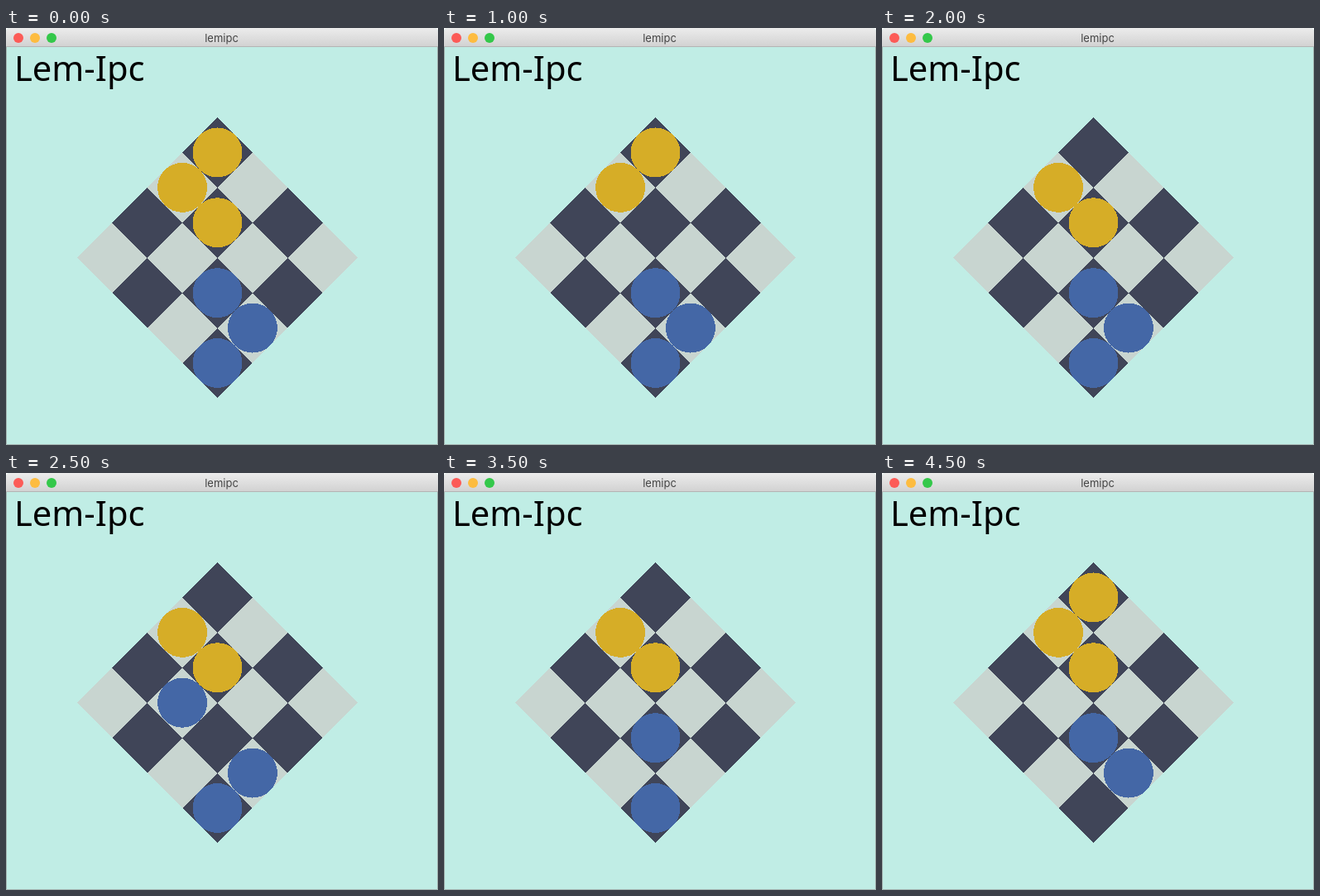
Write an HTML page that moves like this. It is 522 px wide and 504 px high and loops after 5000 ms.

```html
<!DOCTYPE html>
<html lang="en">
<head>
<meta charset="utf-8">
<title>lemipc</title>
<style>
  html, body { margin: 0; width: 100%; height: 100%; overflow: hidden; background: #fff; }
  svg { display: block; }
</style>
</head>
<body>
<svg width="522" height="504" viewBox="0 0 522 504">
  <defs>
    <linearGradient id="bar" x2="0" y2="1">
      <stop stop-color="#ececec"/>
      <stop offset="1" stop-color="#d2d2d2"/>
    </linearGradient>
    <clipPath id="window"><path d="M0 504V5Q0 0 5 0H517Q522 0 522 5V504Z"/></clipPath>
  </defs>
  <g clip-path="url(#window)">
    <rect width="522" height="504" fill="#c0ede5"/>
    <rect width="522" height="22" fill="url(#bar)"/>
    <rect y="22" width="522" height="1" fill="#b4b4b4"/>
    <path d="M.5 23V503.5H521.5V23" fill="none" stroke="#a3b3af"/>
    <circle cx="15" cy="12" r="6" fill="#fc5b57"/>
    <circle cx="35" cy="12" r="6" fill="#fdbc40"/>
    <circle cx="55" cy="12" r="6" fill="#34c84a"/>
    <text x="260.5" y="17" text-anchor="middle" font-family="Inter, sans-serif" font-size="13" fill="#444">lemipc</text>
    <text x="10" y="64" font-family="'Noto Sans', sans-serif" font-size="41.7">Lem-Ipc</text>
  </g>
  <g id="board" shape-rendering="crispEdges"></g>
  <g id="pieces" shape-rendering="crispEdges"></g>
</svg>
<script>
const HALF = 30 * Math.SQRT2; // half the diagonal of a 60 px cell
const STEP_MS = 500;
const YELLOW = '#d6ad27', BLUE = '#4467a6';

// Occupied cells per step, each written as column and row digits
const steps = [
  ['00 01 11', '22 32 33'],
  ['00 01 21', '22 32 33'],
  ['00 01', '22 32 33'],
  ['00 11', '22 32 33'],
  ['01 11', '22 32 33'],
  ['01 11', '12 32 33'],
  ['01 11', '32 33'],
  ['01 11', '22 33'],
  ['01 11', '22 32'],
  ['00 01 11', '22 32'],
];

const center = (col, row) => [255.5 + (col - row) * HALF, 108 + (col + row + 1) * HALF];

function drawBoard() {
  let cells = '';
  for (let col = 0; col < 4; col++) {
    for (let row = 0; row < 4; row++) {
      const [x, y] = center(col, row);
      const fill = (col + row) % 2 ? '#c8d5d0' : '#404558';
      cells += `<path fill="${fill}" d="M${x} ${y - HALF}l${HALF} ${HALF}l${-HALF} ${HALF}l${-HALF} ${-HALF}z"/>`;
    }
  }
  document.getElementById('board').innerHTML = cells;
}

function team(cells, color) {
  return cells.split(' ').map(cell => {
    const [x, y] = center(+cell[0], +cell[1]);
    return `<circle cx="${x}" cy="${y}" r="30" fill="${color}"/>`;
  }).join('');
}

const start = performance.now();
let shown = -1;

function frame() {
  const step = Math.floor((performance.now() - start) / STEP_MS) % steps.length;
  if (step !== shown) {
    const [yellow, blue] = steps[step];
    document.getElementById('pieces').innerHTML = team(yellow, YELLOW) + team(blue, BLUE);
    shown = step;
  }
  requestAnimationFrame(frame);
}

drawBoard();
frame();
</script>
</body>
</html>
```
